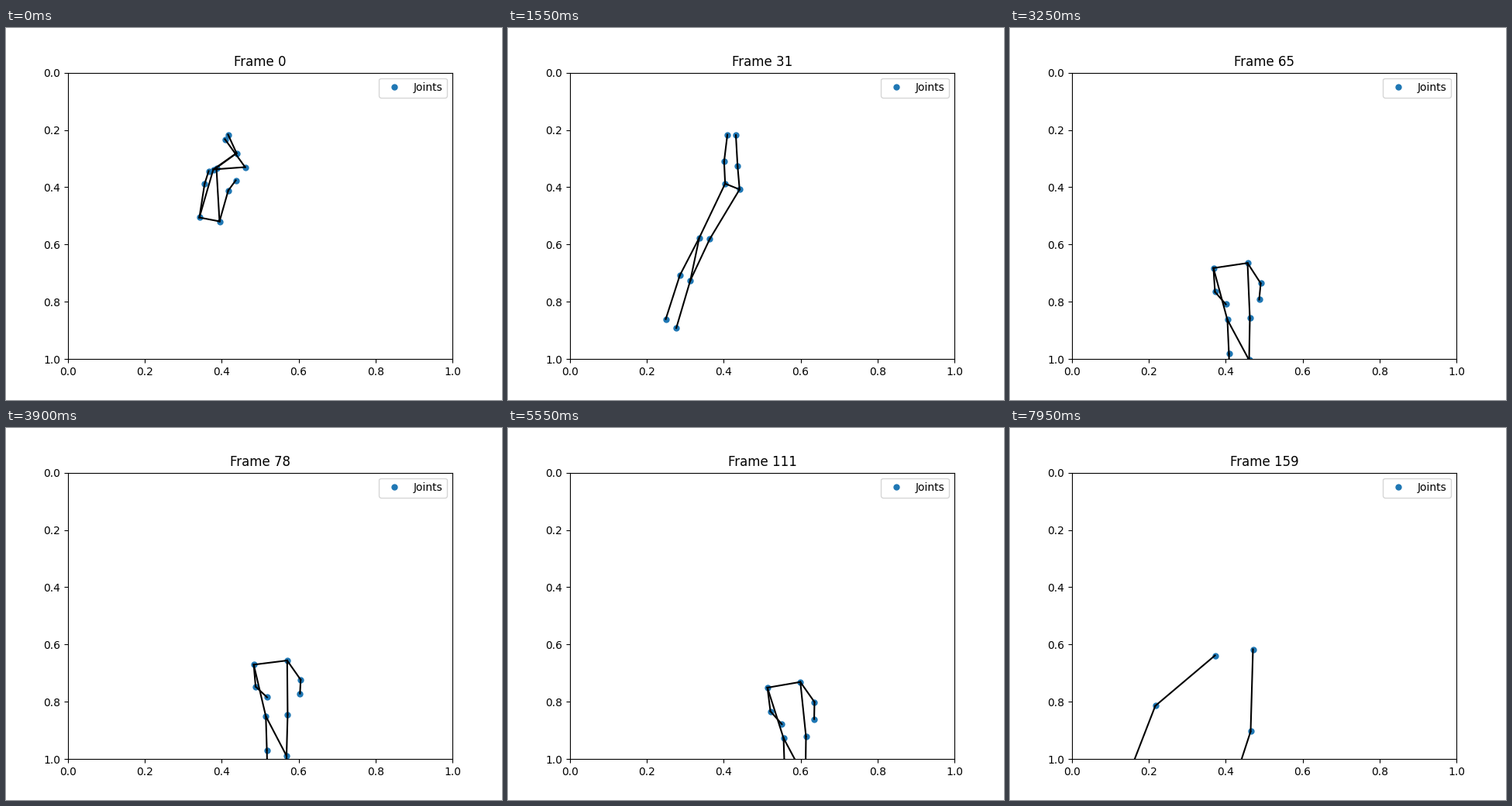
A matplotlib script for the animation above (8 s loop, 640 px wide and 480 px high).

```python
import numpy as np
import matplotlib.pyplot as plt
from matplotlib.animation import FuncAnimation

FRAMES, STEP = 160, 50
WRIST, ELBOW, SHOULDER, HIP, KNEE, ANKLE = range(6)
LEFT, RIGHT = 0, 1

BONES = [((side, k), (side, k + 1)) for side in (LEFT, RIGHT) for k in range(5)]
BONES += [((LEFT, SHOULDER), (RIGHT, SHOULDER)), ((RIGHT, HIP), (LEFT, KNEE))]


def pose(middle, gaps):
    """Split a wrist-to-ankle midline (x + yj pixels) into two sides.

    The left-right gap is set at a few joints and interpolated between them.
    """
    gap = np.interp(range(6), list(gaps), list(gaps.values()))
    return np.array([middle + gap / 2, middle - gap / 2])


def move(p, turn=0, shift=0):
    """Swing a pose about its wrists (degrees), then shift it."""
    grip = p[:, WRIST].mean()
    return (p - grip) * np.exp(-1j * np.radians(turn)) + grip + shift


tuck = pose([278.5+190j, 271+205j, 262+246.5j, 269+181j, 302.5+170j, 284+140j],
            {WRIST: 35+12j, SHOULDER: 26+5j, HIP: 4-2j, KNEE: -11-18j, ANKLE: 4-6j})
hang = pose([233.5+104j, 260+135j, 286+160.5j, 294.5+236.5j, 302+294.5j, 319+355j],
            {WRIST: 3-4j, SHOULDER: 16-3j, HIP: 11-5j, ANKLE: 18+4j})
land = pose([362+226.5j, 344+242.5j, 329+239j, 309+298.5j, 302.5+340.5j, 305+391j],
            {WRIST: 36+9j, ELBOW: 48+17j, HIP: 18-1j})
stand = pose([299.5+353j, 293.5+334.5j, 284+306j, 294.5+375j, 295+424j, 296+472j],
             {WRIST: 43-6j, ELBOW: 59-11j, HIP: 29-2j, KNEE: 26+8j})
pike = pose([371+197.5j, 334+202j, 292+213j, 360+226j, 376.5+283.5j, 388+296.5j],
            {WRIST: 10-11j, SHOULDER: 2-14j, KNEE: 33-9j, ANKLE: 18-51j})
reach = pose([288.5+289j, 248.5+374.5j, 216.5+463j, 220+600j, 220+700j, 220+800j],
             {WRIST: 49-8j, ELBOW: 123+33j, SHOULDER: 137+9j})

KEYS = {
    0: tuck, 6: move(hang, 26, -40), 13: move(hang, 5, 20+50j),
    19: hang, 27: move(hang, -30, 30+12j), 43: land,
    48: move(land, 0, 18j), 65: stand, 77: move(stand, 0, 56),
    86: move(land, 0, 18j), 98: move(land, 0, 14j),
    110: move(stand, 0, 74+30j), 122: move(pike, -20),
    131: move(pike, 8, 16), 135: pike, 139: move(pike, 8, 18),
    146: move(hang, -2, 55+48j), 159: reach,
}
TIMES = np.array(list(KEYS))
POSES = np.array(list(KEYS.values()))
SLOPES = np.gradient(POSES, TIMES, axis=0)

# Spans where tracking drops out and every joint falls to the origin.
LOST = [(4, 8), (50, 53), (89, 96), (114, 121), (151, 155)]


def joints(i):
    if any(a <= i <= b for a, b in LOST):
        return np.zeros((2, 6)), np.zeros((2, 6))
    k = min(np.searchsorted(TIMES, i, side="right") - 1, len(TIMES) - 2)
    h = TIMES[k + 1] - TIMES[k]
    u = (i - TIMES[k]) / h
    v = 1 - u
    p = (v * v * ((1 + 2 * u) * POSES[k] + u * h * SLOPES[k])
         + u * u * ((1 + 2 * v) * POSES[k + 1] - v * h * SLOPES[k + 1]))
    # Pixel centres to axes units
    return (p.real + 0.5 - 80) / 496, (p.imag + 0.5 - 57.6) / 369.6


fig, ax = plt.subplots(figsize=(6.4, 4.8), dpi=100)
ax.set_xlim(0, 1)
ax.set_ylim(1, 0)
dots, = ax.plot([], [], "o", markersize=5, label="Joints")
limbs = [ax.plot([], [], "k-")[0] for _ in BONES]
title = ax.set_title("Frame 0")
ax.legend(loc="upper right")


def draw(i):
    x, y = joints(i)
    dots.set_data(x.ravel(), y.ravel())
    for limb, (a, b) in zip(limbs, BONES):
        limb.set_data([x[a], x[b]], [y[a], y[b]])
    title.set_text(f"Frame {i}")
    return [dots, *limbs, title]


anim = FuncAnimation(fig, draw, frames=FRAMES, interval=STEP,
                     init_func=lambda: draw(0), repeat=True, repeat_delay=0)
plt.show()
```
